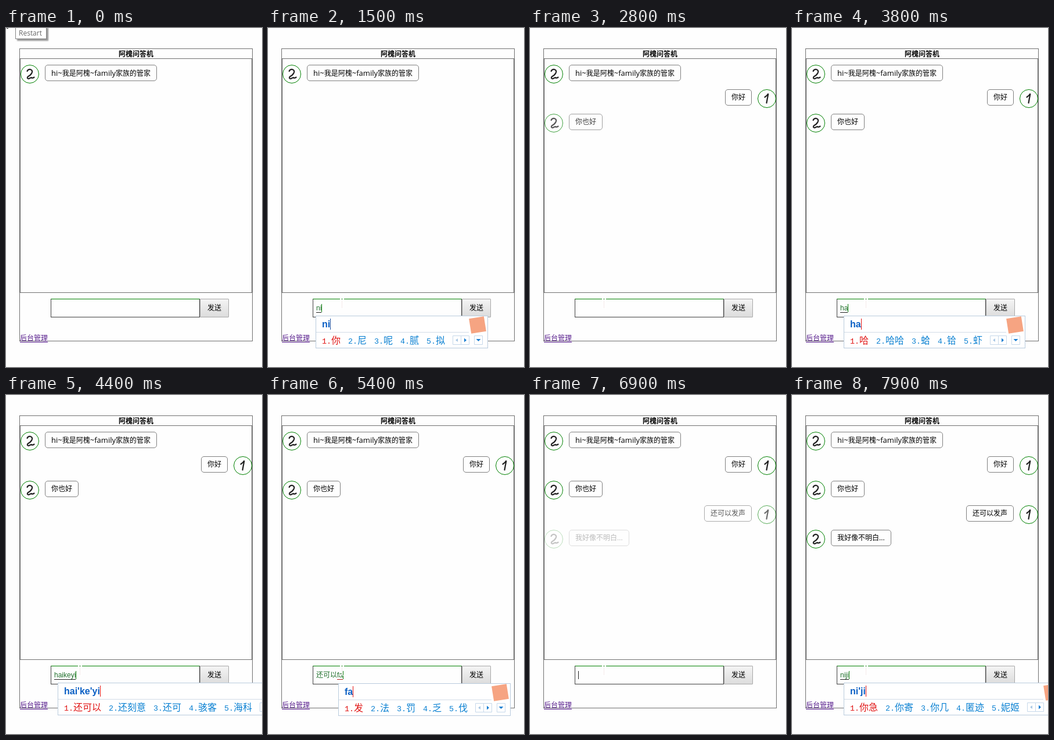
Write an HTML page that moves like this. It is 441 px wide and 581 px high and loops after 8 s.

```html
<!DOCTYPE html>
<html lang="zh-CN">
<head>
<meta charset="utf-8">
<title>Chat</title>
<style>
* { box-sizing: border-box; }
html, body { margin: 0; width: 100%; height: 100%; overflow: hidden; background: #fefefe; }
#stage {
  position: relative; width: 441px; height: 581px; overflow: hidden;
  font: 12px/26px 'Open Sans', 'Noto Sans CJK SC', 'Noto Sans CJK', sans-serif;
  color: #000; white-space: nowrap;
}
#stage > *, .msg > * { position: absolute; }
.frame { border: 1px solid #707070; }
#outer { left: 23px; top: 35px; width: 402px; height: 502px; }
#inner { left: 24px; top: 52px; width: 400px; height: 402px; }
#title { left: 23px; top: 36px; width: 402px; line-height: 17px; text-align: center; font-weight: 700; }
.msg { left: 25px; width: 399px; height: 32px; }
.msg svg { left: 0; top: 0; fill: none; }
.msg p { margin: 0; left: 42px; top: 0; height: 28px; padding: 0 10px; border: 1px solid #808080; border-radius: 5px; }
.msg.me svg { left: auto; right: 0; }
.msg.me p { left: auto; right: 42px; }
.latin { font-size: 13px; }
#input {
  left: 77px; top: 464px; width: 257px; height: 32px; padding-left: 5px;
  border: 1px solid #404040; border-top-color: #008000;
  line-height: 30px; color: #20702c; display: flex; align-items: center;
  font-family: 'Liberation Sans', 'Noto Sans CJK SC', 'Noto Sans CJK', sans-serif;
}
#typing { line-height: 14px; border-bottom: 1px solid #222; margin-top: 1px; }
#typing:empty { display: none; }
#caret { width: 1px; height: 14px; background: #222; }
#send {
  left: 334px; top: 464px; width: 50px; height: 32px; border: 1px solid #a8a8a8; border-radius: 1px;
  background: linear-gradient(#f4f4f4, #dcdcdc); line-height: 30px; text-align: center;
}
#admin { left: 24px; top: 523px; line-height: 18px; color: #551a8b; text-decoration: underline; text-underline-offset: 2px; }
#tip {
  left: 16px; top: -3px; width: 54px; height: 22px; border: 1px solid #858585; background: #fff;
  box-shadow: 3px 3px 2px #999; color: #666; line-height: 22px; padding-left: 5px;
}
#ime { width: max-content; height: 56px; padding: 0 8px 0 10px; border: 1px solid #b9cbdd; background: #fff; }
#top { height: 28px; margin: 0 24px 0 -10px; padding-left: 10px; border-bottom: 1px solid #d3dce6; display: flex; align-items: center; }
#pinyin { font: bold 16px/27px 'Liberation Sans', sans-serif; color: #0a5fc4; }
#bar { width: 1px; height: 19px; }
#search { position: absolute; left: 161px; top: 1px; color: #2468b0; text-decoration: underline; }
#search::before {
  content: ''; position: absolute; left: -20px; top: 7px; width: 13px; height: 13px;
  border: 1px solid #f3e2da; border-radius: 50%;
}
#logo { position: absolute; right: 4px; top: 2px; width: 26px; height: 26px; background: #f6a482; transform: rotate(-9deg); }
#row { display: flex; align-items: center; height: 25px; }
#cands { display: flex; gap: 13px; font: 300 16px/25px 'Noto Sans CJK SC', 'Noto Sans CJK', sans-serif; color: #0a80d2; }
#cands b { font: 13.33px 'Liberation Mono', monospace; }
#cands span:first-child { color: #e01414; }
#row svg { margin-left: 13px; }
#mouse { left: 0; top: 0; }
</style>
</head>
<body>
<div id="stage">
  <div id="outer" class="frame"></div>
  <div id="inner" class="frame"></div>
  <div id="title">阿槐问答机</div>
  <div id="admin">后台管理</div>
  <div id="input"><span id="done"></span><span id="typing"></span><i id="caret"></i></div>
  <div id="send">发送</div>
  <div id="ime">
    <div id="top"><span id="pinyin"></span><i id="bar"></i></div>
    <span id="search"></span>
    <div id="logo"></div>
    <div id="row">
      <div id="cands"></div>
      <svg width="52" height="16" fill="none" stroke="#c6d8ea">
        <path d="M.5.5h14v15h-14zM14.5.5h14v15h-14zM37.5.5h14v15h-14z"/>
        <path d="M9 5v6l-4-3z" fill="#a9c8e4" stroke="none"/>
        <path d="M20 4.500v7l4-3.500zM40.500 6h8l-4 4z" fill="#1a7ed2" stroke="none"/>
      </svg>
    </div>
  </div>
  <div id="tip">Restart</div>
  <svg id="mouse" width="441" height="581" fill="none">
    <path id="arrow" d="M0 0v16l4-4 3 7 2-1-3-6h5z" fill="#fff" stroke="#000"/>
    <g id="beam" stroke="#fff">
      <path d="M124 464.500h2.500M128.500 464.500h2.500M124 480.500h2.500M128.500 480.500h2.500"/>
      <path d="M127.500 465v15" stroke="#f5ebea"/>
    </g>
  </svg>
</div>
<script>
const LOOP = 8000, STEP = 100;
const $ = id => document.getElementById(id);

const digits = {
  bot: 'M11.500 11Q13 7.500 17 8Q21.500 9.500 19.500 14Q17.500 18 12.500 20.500Q10.500 23.500 14 24Q17 22.500 18.500 22Q20.500 23.500 23.500 21.500',
  me: 'M12.500 13.500Q16.500 11 18.500 7.500Q17 15 15.500 23.500'
};
// who, top, text, fade start, fade length
const messages = [
  ['bot', 63, '<span class="latin">hi~</span>我是阿槐<span class="latin">~family</span>家族的管家', -1, 0],
  ['me', 105, '你好', 2090, 600],
  ['bot', 147, '你也好', 2130, 1000],
  ['me', 189, '还可以发声', 6540, 600],
  ['bot', 231, '我好像不明白...', 6560, 1000]
].map(([who, top, text, start, length]) => {
  const el = document.createElement('div');
  el.className = 'msg ' + who;
  el.style.top = top + 'px';
  el.innerHTML = `<svg width="32" height="32"><circle cx="16" cy="16" r="15.500" stroke="#008000"/>
    <path d="${digits[who]}" stroke="#222" stroke-width="2.200" stroke-linecap="round"/></svg><p>${text}</p>`;
  $('stage').insertBefore(el, $('input'));
  return { el, start, length };
});

// time, committed text, pinyin, candidates, search term
const typing = [
  [0, ''],
  [1500, '', 'ni', '你 尼 呢 腻 拟'],
  [1600, '', "ni'h", '你好 你会 你还 你和 您好'],
  [1700, '', "ni'ha", '你哈 你好 你还 尼哈 你喊'],
  [1800, '', "ni'hao", '你好 拟好 你号 尼好 你耗'],
  [1900, '你好'],
  [2100, ''],
  [3700, '', 'h', '好 和 还 会 很'],
  [3800, '', 'ha', '哈 哈哈 蛤 铪 虾'],
  [3900, '', 'hai', '还 还是 孩子 海 还有'],
  [4100, '', "hai'k", '还可 还看 海口 还快 开'],
  [4200, '', "hai'ke", '还可 骇客 海科 还课 还刻'],
  [4300, '', "hai'ke'y", '还可以 还可 骇客 海科 还课'],
  [4400, '', "hai'ke'yi", '还可以 还刻意 还可 骇客 海科'],
  [4500, '', "hai'ke'yi", '还可以 还刻意 还可 骇客 海科', '还可以'],
  [4700, '还可以'],
  [5000, '还可以', 'f', '发 放 个 分 非'],
  [5100, '还可以', 'f', '发 放 分 飞 非'],
  [5400, '还可以', 'fa', '发 法 罚 乏 伐'],
  [5500, '还可以', "fa's", '发送 发生 发 法 罚'],
  [5600, '还可以', "fa'sh", '发生 发送 发烧 发 法'],
  [5800, '还可以', "fa'shen", '发生 发神 发深 发 法'],
  [6200, '还可以', "fa'sheng", '发声 发生 发绳 发 法', '发声'],
  [6400, '还可以发声'],
  [6500, ''],
  [7400, '', 'n', '你 那 能 年 哪'],
  [7600, '', 'ni', '你 尼 呢 腻 拟'],
  [7800, '', "ni'j", '你家 你叫 你就 你将 你即'],
  [7900, '', "ni'ji", '你急 你寄 你几 匿迹 妮姬']
];
const caretOff = [[0, 300], [700, 1100], [2600, 3100], [7000, 7400]];

const show = (el, on) => { el.style.visibility = on ? 'visible' : 'hidden'; };
const swing = p => 0.5 - Math.cos(Math.PI * Math.min(1, Math.max(0, p))) / 2;

function drawIme(t) {
  const [, done, pinyin = '', cands = '', term = ''] = typing.filter(s => s[0] <= t).pop();
  const left = done ? 121 : t < 2000 ? 82 : 89;
  $('done').textContent = done;
  $('typing').textContent = pinyin.replaceAll("'", '');
  $('typing').style.borderColor = done ? '#b02020' : '#222';
  $('caret').style.background = done || pinyin ? '#108010' : '#222';
  show($('caret'), !caretOff.some(([a, b]) => t >= a && t < b));

  $('ime').style.display = pinyin ? 'block' : 'none';
  $('ime').style.left = left + 'px';
  $('ime').style.top = (done ? 494 : 493) + 'px';
  $('pinyin').textContent = pinyin;
  $('bar').style.background = left === 82 ? '#1a4fa0' : '#e01414';
  $('cands').innerHTML = cands.split(' ').map((c, i) => `<span><b>${i + 1}.</b>${c}</span>`).join('');
  $('search').textContent = '6.搜索：' + term;
  $('search').style.display = term ? 'block' : 'none';
}

function draw(t) {
  for (const { el, start, length } of messages)
    el.style.opacity = length ? swing((t - start) / length) : 1;

  $('tip').style.opacity = Math.max(0, 1 - t / 500);
  const p = Math.sin(Math.min(1, t / 400) * Math.PI / 2);
  $('arrow').setAttribute('transform', `translate(${-5 + 132 * p} ${-18 + 490 * p})`);
  show($('arrow'), t < 300);
  show($('beam'), t >= 300);
  drawIme(t);
}

let last = -1;
function tick() {
  const t = Math.floor(performance.now() % LOOP / STEP) * STEP;
  if (t !== last) draw(last = t);
  requestAnimationFrame(tick);
}
tick();
</script>
</body>
</html>
```
